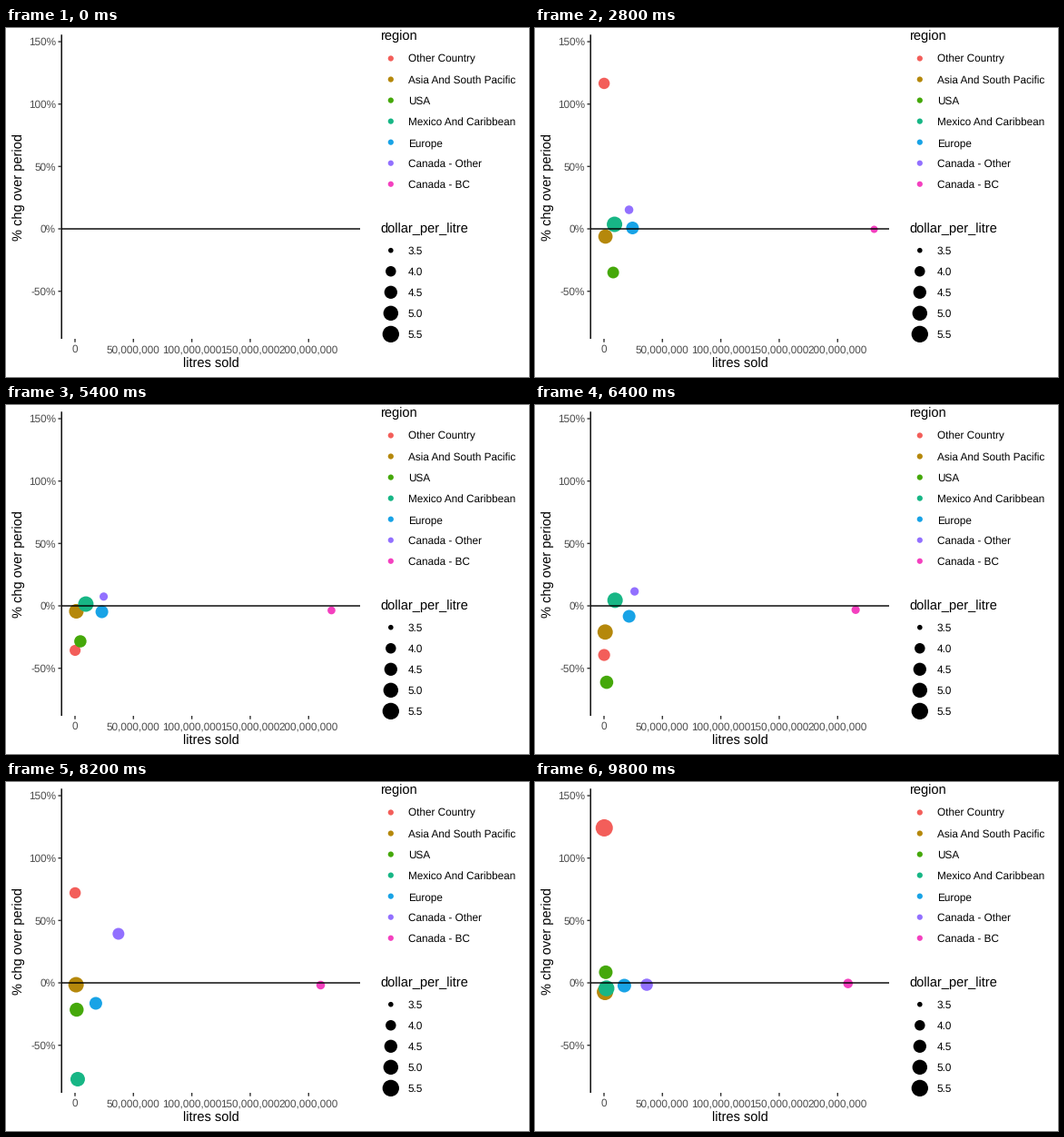
Write a matplotlib script that moves like this. It is 576 px wide and 384 px high and loops after 10000 ms.

```python
import numpy as np
import matplotlib.pyplot as plt
from matplotlib.animation import FuncAnimation
from matplotlib.patches import Circle

plt.rcParams["font.family"] = ["Liberation Sans", "DejaVu Sans"]
plt.rcParams["text.hinting"] = "none"
plt.rcParams["toolbar"] = "None"

W, H, DPI = 576, 384, 96
FRAMES, INTERVAL = 50, 200
KEYS = [8, 16, 25, 33, 41, 49]  # frame on which each period is reached
LEFT, RIGHT, TOP, BOTTOM = 61.2, 390, 7.3, 342
TITLE, LABEL = 11, 8.8
LINE = 1.07

# name, colour, million litres, % change, dot diameter in px; one value per period
REGIONS = [
    ("Other Country", "#F35E5A",
     [0.1, 0.1, 0.1, 0.1, 0.1, 0.2],
     [31.3, 145, -34.2, -40.1, 72.1, 124.2],
     [13, 12.3, 11.7, 13.4, 12.5, 19]),
    ("Asia And South Pacific", "#B5880B",
     [1.3, 1.2, 1.2, 0.95, 0.9, 0.85],
     [-1.8, -7.6, 2.3, -24.3, -1.5, -7.3],
     [15, 16, 15.8, 17, 17, 18]),
    ("USA", "#45A80A",
     [12, 6.5, 5.5, 1.8, 1.4, 1.5],
     [-0.4, -46.5, -15.3, -67.8, -21.5, 8.5],
     [12.7, 13, 13.1, 14.8, 15.4, 15]),
    ("Mexico And Caribbean", "#17B685",
     [8.7, 9.1, 9.2, 9.5, 2.3, 2.1],
     [1.9, 4.2, 0.2, 5.1, -77.2, -4.4],
     [17, 17, 17, 17, 16, 17.5]),
    ("Europe", "#18A3E6",
     [24.4, 24.4, 23.6, 21.2, 17.8, 17.4],
     [2.9, 0, -3.3, -9.1, -16.4, -2.2],
     [14, 14, 14, 14, 14, 15]),
    ("Canada - Other", "#9270FF",
     [18.5, 22.4, 23.9, 26.5, 37.2, 36.6],
     [-2.2, 21.1, 5.8, 12.4, 39.3, -1.5],
     [9.5, 9.5, 9, 9.3, 13, 13.5]),
    ("Canada - BC", "#F440BF",
     [233.6, 230.5, 221.2, 214.6, 210.3, 208.9],
     [0.9, -0.8, -3.8, -3.1, -1.8, -0.5],
     [8, 8, 8.5, 9.2, 9.5, 10.5]),
]
SIZES = [("3.5", 5.6), ("4.0", 11.5), ("4.5", 14.3), ("5.0", 16.4), ("5.5", 18.3)]

fig = plt.figure(figsize=(W / DPI, H / DPI), dpi=DPI, facecolor="white")
ax = fig.add_axes([0, 0, 1, 1])
ax.set_xlim(0, W)
ax.set_ylim(H, 0)
ax.axis("off")


def px(litres):
    return 76 + 1.2865 * litres


def py(percent):
    return 221 - 1.373 * percent


def line(x0, y0, x1, y1, color="black", z=3):
    ax.plot([x0, x1], [y0, y1], color=color, lw=LINE, zorder=z,
            solid_capstyle="butt", snap=False)


def text(x, y, s, size=LABEL, color="black", ha="left", **kw):
    ax.text(x, y, s, size=size, color=color, ha=ha, va="baseline", **kw)


def dot(x, y, diameter, color, z=2):
    return ax.add_patch(Circle((x, y), diameter / 2, fc=color, lw=0, zorder=z))


def draw_axes():
    line(LEFT, TOP, LEFT, BOTTOM)
    line(LEFT, py(0), RIGHT, py(0))
    for pct in range(-50, 151, 50):
        y = py(pct)
        line(LEFT - 3.7, y, LEFT, y, "#333333")
        text(54.7, y + 4.2, f"{pct}%", color="#4D4D4D", ha="right")
    for litres in range(0, 201, 50):
        x = px(litres)
        line(x, BOTTOM, x, BOTTOM + 3.7, "#333333")
        text(x, 357, f"{litres * 10**6:,}", color="#4D4D4D", ha="center")
    text(225.6, 374, "litres sold", TITLE, ha="center")
    ax.text(18, 175, "% chg over period", size=TITLE, rotation=90,
            ha="right", va="center", rotation_mode="default").remove()
    ax.text(18, 175, "% chg over period", size=TITLE, rotation=90,
            ha="center", va="baseline", rotation_mode="anchor")


def draw_legend():
    text(412.3, 13.3, "region", TITLE)
    for i, (name, color, *_) in enumerate(REGIONS):
        y = 33.5 + 23.04 * i
        dot(423.8, y, 6.2, color)
        text(442.7, y + 4.4, name)
    text(412.3, 225, "dollar_per_litre", TITLE)
    for i, (name, diameter) in enumerate(SIZES):
        y = 244.7 + 23.04 * i
        dot(423.8, y, diameter, "black")
        text(442.7, y + 4.4, name)


draw_axes()
draw_legend()
dots = [dot(0, 0, 1, region[1]) for region in REGIONS]


def update(frame):
    for patch, (_, _, litres, pct, diameter) in zip(dots, REGIONS):
        x, y, d = (np.interp(frame, KEYS, v) for v in (litres, pct, diameter))
        patch.center = px(x), py(y)
        patch.radius = d / 2
        patch.set_visible(frame >= KEYS[0])
    return dots


anim = FuncAnimation(fig, update, frames=FRAMES, interval=INTERVAL,
                     repeat=True, repeat_delay=0, blit=False)
plt.show()
```
